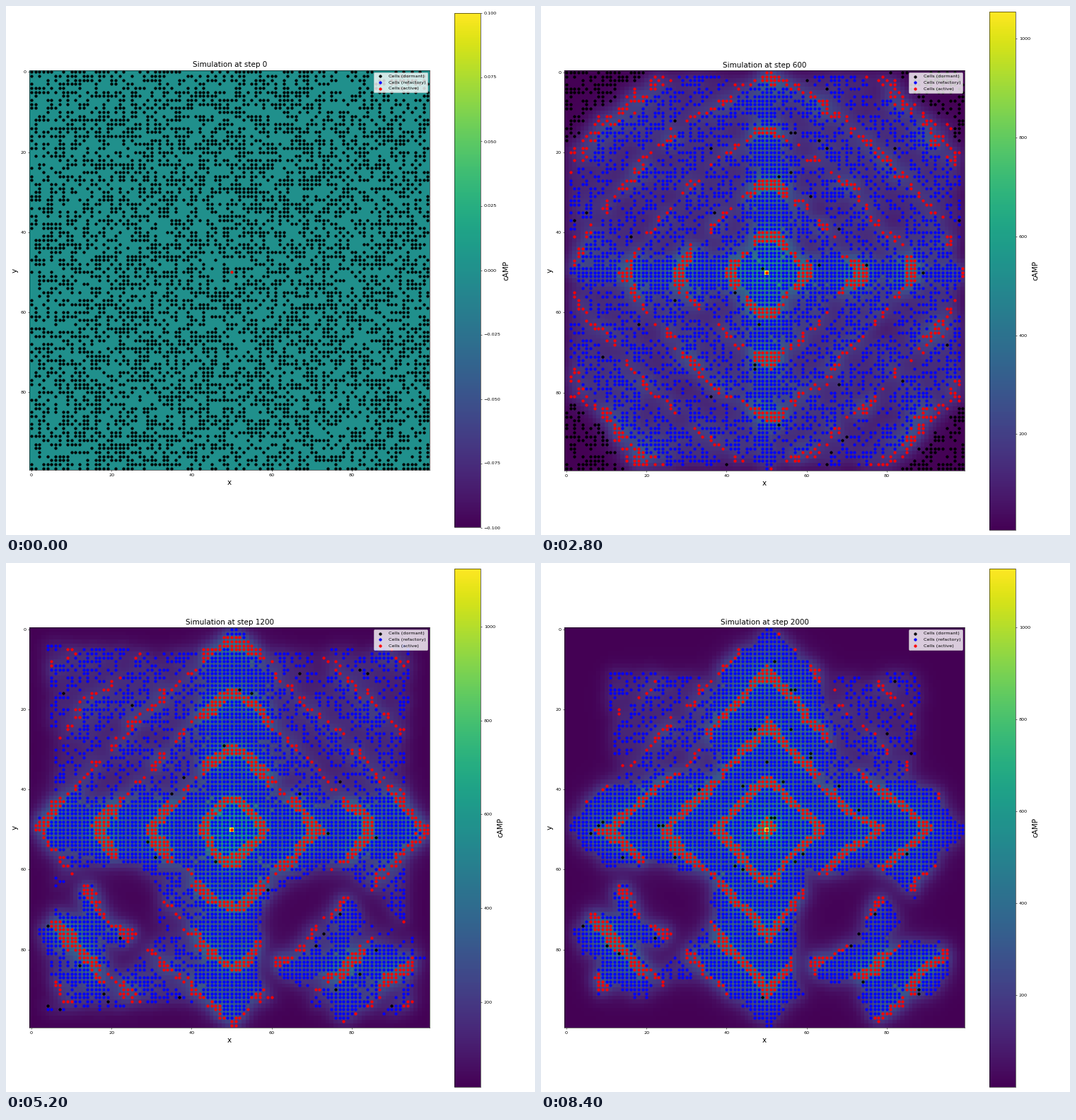
Write a matplotlib script that moves like this. It is 748 by 748 pixels and loops after 8.8 s.

```python
import numpy as np
import matplotlib.pyplot as plt
from matplotlib.animation import FuncAnimation

N, MID = 100, 50
PERIOD = 124            # steps between two pulses of the pacemaker
STRIDE = 100            # steps between two pictures
FRAMES, INTERVAL = 22, 400
ISLANDS = ((78, 84, 18), (14, 76, 13))   # x, y, radius of stray clusters

plt.rcParams.update({"xtick.labelsize": 9.3, "ytick.labelsize": 9.3,
                     "legend.fontsize": 9.3})
rng = np.random.default_rng(7)
yy, xx = np.mgrid[0:N, 0:N]
dist = np.hypot(xx - MID, yy - MID)


def blur(a, sigma):
    i = np.arange(N)
    g = np.exp(-((i[:, None] - i) / sigma) ** 2 / 2)
    g /= g[MID].sum()
    return g @ a @ g.T


def soft_abs(v):
    return np.hypot(v, 1.5) - 1.5


def ramp(v, lo, hi):
    return np.clip((v - lo) / (hi - lo), 0, 1)


rough = blur(rng.normal(size=(N, N)), 2)
rough = 0.05 * rough / rough.std() + 0.015 * rng.normal(size=(N, N))
lazy = rng.random((N, N)) < 0.04


def phase(step):
    """Pulses that have passed each site; below zero before the first."""
    p = 1.4 - 0.00026 * step        # rings turn from round to star-shaped
    r = (soft_abs(xx - MID) ** p + soft_abs(yy - MID) ** p) ** (1 / p) + 1
    arrival = (np.sqrt(11 ** 2 + 2.2 * r) - 11) / 1.1    # r = 11u + 0.55u^2
    x, y, size = ISLANDS[0]
    late = np.hypot(xx - x, yy - y) < size
    arrival += 0.4 * late * ramp(step, 600, 800)
    lead = ramp(step, 0, 200)
    u = step / PERIOD - arrival + rough + 0.1 * lead
    return np.where((u < 0) & (u > -0.15 * lead), 0, u)   # first pulse is wide


def goals(step):
    gx, gy = np.full((N, N), MID), np.full((N, N), MID)
    if step >= 700:
        for x, y, size in ISLANDS:
            near = np.hypot(xx - x, yy - y) < size
            gx[near], gy[near] = x, y
    return gx, gy


def migrate(cells, hit, step):
    """Each cell that a pulse has hit takes one step towards its goal."""
    gx, gy = goals(step)
    way_x, way_y = gx - xx, gy - yy
    far = np.hypot(way_x, way_y)
    movers = np.argwhere(cells & hit & (far > 0))
    for y, x in sorted(movers.tolist(), key=lambda c: far[c[0], c[1]]):
        wx, wy = way_x[y, x], way_y[y, x]
        sx, sy = np.sign(wx), np.sign(wy)
        side = (sx, 0) if abs(wx) < abs(wy) else (0, sy)
        for mx, my in ((sx, sy), side):
            if not cells[y + my, x + mx]:
                cells[y, x], cells[y + my, x + mx] = False, True
                break


def simulate():
    cells = rng.random((N, N)) < 0.5
    cells[MID, MID] = True
    history = [cells.copy()]
    before = phase(0)
    for step in range(STRIDE, (FRAMES - 1) * STRIDE, STRIDE):
        now = phase(step)
        hit = (now >= 0) & (np.floor(now) > np.floor(before))
        migrate(cells, hit, step)
        history.append(cells.copy())
        before = now
    return history


history = simulate()


def state(step):
    cells, u = history[step // STRIDE], phase(step)
    f = u % 1
    active = cells & (u >= 0) & (f < 0.26)
    dormant = cells & ((u < 0) | ((f > 0.82) & lazy))
    active[MID, MID], dormant[MID, MID] = True, False
    refractory = cells & ~active & ~dormant

    away = np.abs((f + 0.35) % 1 - 0.5)
    release = cells * (u >= 0) * (0.42 + 0.58 * np.exp(-(away / 0.18) ** 2))
    camp = 430 * blur(release, 1.8) + 190 * blur(release, 4.5)
    camp += 220 * ramp(step, 0, 100) * np.exp(-(dist / 6) ** 2)
    return camp, (dormant, refractory, active)


def limits(step):
    """Lowest level, and the peak that swings with the pacemaker."""
    s = max(step - 580, 0) / 220
    low = 62 * (s * np.exp(1 - s)) ** 1.5
    peak = 1140 + 90 * np.cos(2 * np.pi * (step / PERIOD - 0.4))
    return low, peak * (1 - np.exp(-(step + 25) / 90))


fig = plt.figure(figsize=(14.96, 14.96), dpi=50)


def draw(i):
    step = max(i - 1, 0) * STRIDE
    camp, groups = state(step)
    if i == 0:
        camp, (low, high) = np.zeros((N, N)), (-0.1, 0.1)
    else:
        low, high = limits(step)
        camp = np.clip(camp + low, low, high)
        camp[MID, MID] = high

    fig.clear()
    fig.subplots_adjust(left=0.125, right=0.9, bottom=0.11, top=0.88)
    ax = fig.add_subplot()
    image = ax.imshow(camp, cmap="viridis", vmin=low, vmax=high)
    bar = fig.colorbar(image, ax=ax)
    bar.set_label("cAMP", fontsize=15)
    for mask, color, name in zip(groups, ("black", "blue", "red"),
                                 ("dormant", "refactory", "active")):
        y, x = np.nonzero(mask)
        ax.scatter(x, y, s=25, c=color, label=f"Cells ({name})")
    ax.set(xlim=(-0.5, N - 0.5), ylim=(N - 0.5, -0.5))
    ax.set_title(f"Simulation at step {step}", fontsize=15)
    ax.set_xlabel("x", fontsize=15)
    ax.set_ylabel("y", fontsize=15)
    ax.legend(loc="upper right")
    fig.tight_layout()
    return []


anim = FuncAnimation(fig, draw, frames=FRAMES, interval=INTERVAL,
                     init_func=lambda: [], repeat=True, repeat_delay=0)
plt.show()
```
